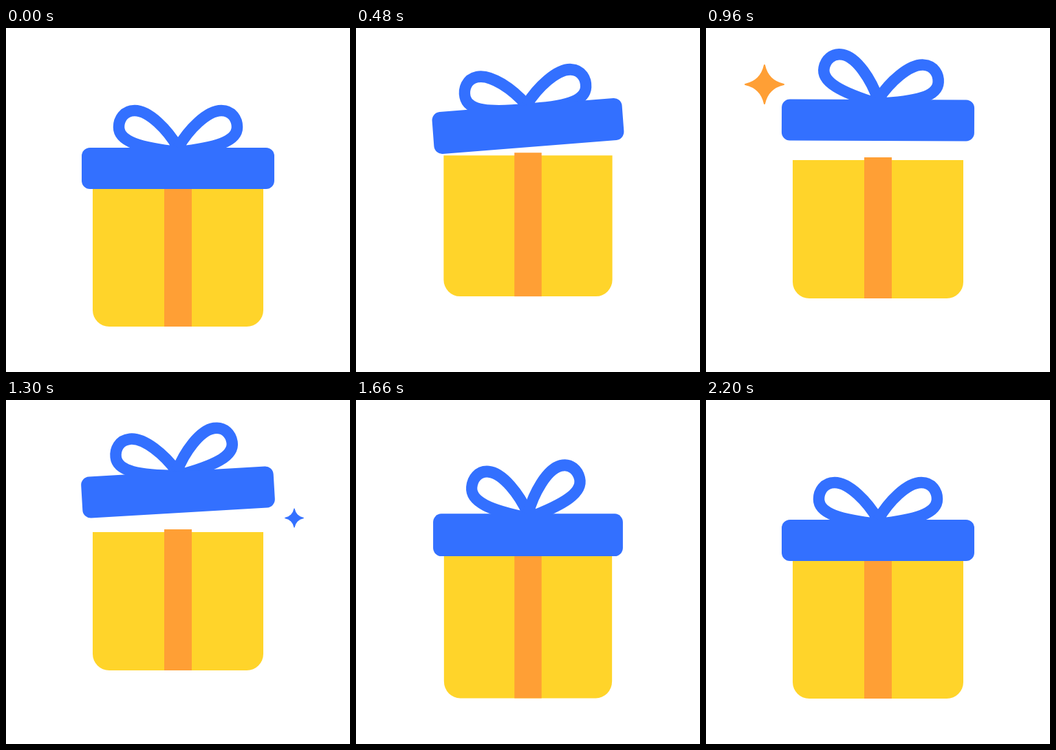
An HTML page for the animation above (4040 ms loop, 500x500 px).

```html
<!DOCTYPE html>
<html lang="en">
<head>
<meta charset="utf-8">
<title>Gift box</title>
<style>
  html, body { margin: 0; width: 100%; height: 100%; overflow: hidden; background: #fff; }
  svg { display: block; width: 100%; height: 100%; }
</style>
</head>
<body>
<svg viewBox="0 0 500 500">
  <defs>
    <path id="ear" d="M250 174C235 148 208 120 187 120C171 120 164 133 164 144C164 165 195 174 250 180"
      fill="none" stroke="#3370ff" stroke-width="16.5"/>
    <path id="spark" d="M0-28Q5-5 28 0Q5 5 0 28Q-5 5-28 0Q-5-5 0-28Z" stroke-width="2" stroke-linejoin="round"/>
  </defs>
  <g id="gift">
    <g id="body">
      <path d="M126 233H374V410A24 24 0 0 1 350 434H150A24 24 0 0 1 126 410Z" fill="#ffd42a"/>
      <rect x="230" y="229" width="40" height="205" fill="#ff9f35"/>
    </g>
    <g id="lid">
      <g id="leftEar"><use href="#ear"/></g>
      <g id="rightEar"><use href="#ear" transform="translate(500 0) scale(-1 1)"/></g>
      <rect x="110" y="174" width="280" height="60" rx="12" fill="#3370ff"/>
    </g>
  </g>
  <use id="orangeStar" href="#spark" fill="#ff9f35" stroke="#ff9f35"/>
  <use id="blueStar" href="#spark" fill="#3370ff" stroke="#3370ff"/>
</svg>
<script>
const LOOP = 4040;

// Each track is a list of [time in ms, value], eased between neighbours.
const tracks = {
  scaleX: [[170, 1], [270, 1.1], [400, 0.97], [540, 1], [1480, 1], [1660, 0.985], [1740, 1.03], [1880, 0.998], [2040, 1]],
  scaleY: [[170, 1], [270, 0.9], [400, 1.05], [540, 1], [1480, 1], [1660, 1.03], [1740, 0.97], [1880, 1.004], [2040, 1]],
  bodyY: [[280, 0], [520, -46], [760, -41], [1420, -41], [1680, 0]],
  lidY: [[280, 0], [520, -60], [760, -70], [1420, -70], [1680, 0]],
  lidTilt: [[300, 0], [640, -8], [800, 6], [1130, -6], [1500, 0]],
  leftTilt: [[300, 0], [440, -8], [660, 0], [960, 11], [1220, -6], [1480, 10], [1660, 5], [1760, -5], [1900, 3], [2200, 0]],
  rightTilt: [[300, 0], [440, 8], [660, 0], [960, 3], [1130, -13], [1300, -5.5], [1480, -18], [1660, -14], [1760, 5], [1900, -5], [2200, 0]],
  orangeSize: [[800, 0], [960, 1], [1120, 0]],
  blueSize: [[1060, 0], [1220, 1], [1380, 0]]
};

function valueAt(keys, t) {
  const next = keys.findIndex(key => key[0] > t);
  if (next === 0) return keys[0][1];
  if (next < 0) return keys[keys.length - 1][1];
  const [t0, v0] = keys[next - 1], [t1, v1] = keys[next];
  return v0 + (v1 - v0) * (1 - Math.cos(Math.PI * (t - t0) / (t1 - t0))) / 2;
}

function place(id, transform) {
  document.getElementById(id).setAttribute("transform", transform);
}

function draw() {
  const t = performance.now() % LOOP;
  const at = name => valueAt(tracks[name], t);
  place("gift", `translate(250 434) scale(${at("scaleX")} ${at("scaleY")}) translate(-250 -434)`);
  place("body", `translate(0 ${at("bodyY")})`);
  place("lid", `translate(0 ${at("lidY")}) rotate(${at("lidTilt")} 250 204)`);
  place("leftEar", `rotate(${at("leftTilt")} 250 174)`);
  place("rightEar", `rotate(${at("rightTilt")} 250 174)`);
  place("orangeStar", `translate(85 82) scale(${at("orangeSize")})`);
  place("blueStar", `translate(419 171.5) scale(${at("blueSize")})`);
  requestAnimationFrame(draw);
}
draw();
</script>
</body>
</html>
```
